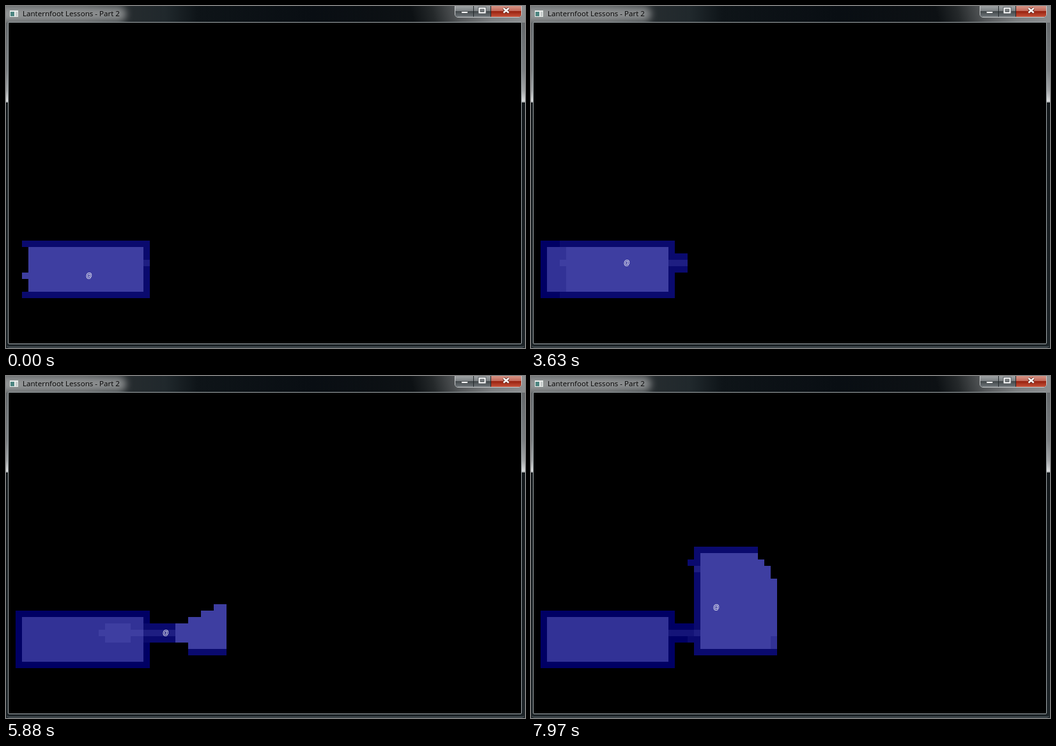
An HTML page with a canvas that plays this animation: 812 px wide and 535 px high, repeating every 8 s.

```html
<!DOCTYPE html>
<html lang="en">
<head>
<meta charset="utf-8">
<title>Lanternfoot Lessons - Part 2</title>
<style>
  html, body { margin: 0; width: 100%; height: 100%; overflow: hidden; background: #0b0f12; }
  .window { position: absolute; left: 0; top: 0; width: 812px; height: 535px; overflow: hidden;
    background: linear-gradient(#0d1215, #0d1215 150px, #12171a 151px, #1d2428); }
  .window * { position: absolute; box-sizing: border-box; }
  .glass { left: 0; top: 0; width: 812px; height: 26px; background:
    linear-gradient(75deg, transparent 78%, #24282a 82%, #56595b 87%, #7d8082 93%, #8c8f91),
    linear-gradient(90deg, #5c6062, #4a4e50 120px, #262c2f 190px, #20282c 250px, #0e1418 300px, #090e13 480px, #0d1114 640px); }
  .glow { left: -14px; top: 1px; width: 202px; height: 23px; border-radius: 11px;
    background: #a2a4a5; opacity: .78; filter: blur(6px); }
  .side { top: 26px; width: 4px; height: 125px;
    background: linear-gradient(#63676a, #7b7f82 60%, #a2a5a7 85%, #d9dbdc 98%, #8a8d8f); }
  .title { left: 26px; top: 3px; font: 11.6px/17px "Open Sans", "Noto Sans", sans-serif; color: #000; white-space: pre; }
  .icon { left: 5px; top: 6px; width: 15px; height: 12px; background: #e9eceb; border: 1px solid #8b9290; }
  .icon i { left: 1px; top: 2px; width: 6px; height: 7px; background: #4c8580; }
  .icon b { left: 9px; top: 2px; width: 3px; height: 7px; background: #c5cbca; }
  .frame { left: 3px; top: 25px; width: 804px; height: 504px; border: 1px solid #a3abae; border-radius: 2px; background: #000; }
  .edge { left: 0; top: -4px; width: 812px; height: 538px; border: 1px solid #59636a; border-top: 0;
    border-color: transparent transparent #667077; border-radius: 0 0 5px 5px; }
  .buttons { left: 702px; top: -2px; width: 105px; height: 20px; border: 1px solid #c9cccd; border-radius: 0 0 5px 5px;
    background: #24292c; overflow: hidden; }
  .btn { top: 0; height: 18px; background: linear-gradient(#a3a7a9, #7d8285 48%, #42484b 52%, #70767a); }
  .close { background: linear-gradient(#d89a8c, #c4695a 48%, #98210f 52%, #c5523a); }
  svg, canvas { left: 0; top: 0; }
</style>
</head>
<body>
<div class="window">
  <div class="glass"></div>
  <div class="glow"></div>
  <div class="side" style="left:0"></div>
  <div class="side" style="left:807px;width:5px"></div>
  <div class="edge"></div>
  <div class="frame"></div>
  <div class="icon"><i></i><b></b></div>
  <div class="title">Lanternfoot Lessons - Part 2</div>
  <div class="buttons">
    <div class="btn" style="left:0;width:28px"></div>
    <div class="btn" style="left:29px;width:26px"></div>
    <div class="btn close" style="left:56px;width:47px"></div>
  </div>
  <svg width="812" height="26" fill="none" stroke="#fff">
    <rect x="712.5" y="8.5" width="10" height="3" fill="#fff" stroke="#53595c"/>
    <rect x="740.5" y="3.5" width="9" height="7" stroke="#53595c" stroke-width="4"/>
    <rect x="740.5" y="3.5" width="9" height="7" stroke-width="2"/>
    <path d="M778.5 3.5l8 7m0-7l-8 7" stroke="#5f2a22" stroke-width="4.4"/>
    <path d="M778.5 3.5l8 7m0-7l-8 7" stroke-width="2.6"/>
  </svg>
  <canvas id="map" width="812" height="535"></canvas>
</div>
<script>
const LOOP = 8000, CELL = 10, LEFT = 5, TOP = 27, COLS = 80, ROWS = 50, RADIUS = 10;
const WALL = 0, TUNNEL = 1, GROUND = 2;
const DARK = ['rgb(0,0,100)', 'rgb(20,20,120)', 'rgb(50,50,150)'];
const LIT = ['rgb(10,10,110)', 'rgb(30,30,130)', 'rgb(62,62,161)'];

// Dungeon
const map = new Uint8Array(COLS * ROWS);
const at = (x, y) => x + y * COLS;
function carve(x0, y0, x1, y1, kind) {
  for (let y = y0; y <= y1; y++)
    for (let x = x0; x <= x1; x++) map[at(x, y)] = kind;
}
carve(2, 35, 20, 41, GROUND);
carve(26, 25, 44, 39, GROUND);
carve(21, 37, 25, 37, TUNNEL);
carve(22, 27, 25, 27, TUNNEL);
carve(35, 22, 35, 24, TUNNEL);

// Field of view: Bresenham rays to the edge of a box, then walls beside lit floor
function castRay(vis, px, py, tx, ty) {
  const sx = Math.sign(tx - px), sy = Math.sign(ty - py);
  const ax = Math.abs(tx - px), ay = Math.abs(ty - py);
  let x = px, y = py, e = Math.max(ax, ay);
  while (x !== tx || y !== ty) {
    if (ax > ay) {
      x += sx;
      e -= 2 * ay;
      if (e < 0) { y += sy; e += 2 * ax; }
    } else {
      y += sy;
      e -= 2 * ax;
      if (e < 0) { x += sx; e += 2 * ay; }
    }
    if ((x - px) ** 2 + (y - py) ** 2 > RADIUS * RADIUS) return;
    vis.add(at(x, y));
    if (map[at(x, y)] === WALL) return;
  }
}

function lightWalls(vis, x0, y0, x1, y1, dx, dy) {
  const light = (x, y) => {
    if (x >= x0 && x <= x1 && y >= y0 && y <= y1 && map[at(x, y)] === WALL) vis.add(at(x, y));
  };
  for (let x = x0; x <= x1; x++)
    for (let y = y0; y <= y1; y++)
      if (vis.has(at(x, y)) && map[at(x, y)] !== WALL) {
        light(x + dx, y);
        light(x, y + dy);
        light(x + dx, y + dy);
      }
}

function look(px, py) {
  const vis = new Set([at(px, py)]);
  const x0 = Math.max(0, px - RADIUS), x1 = px + RADIUS - 1;
  const y0 = Math.max(0, py - RADIUS), y1 = Math.min(ROWS, py + RADIUS) - 1;
  for (let x = x0; x <= x1; x++) { castRay(vis, px, py, x, y0); castRay(vis, px, py, x, y1); }
  for (let y = y0; y <= y1; y++) { castRay(vis, px, py, x0, y); castRay(vis, px, py, x1, y); }
  lightWalls(vis, x0, y0, px, py, -1, -1);
  lightWalls(vis, px, y0, x1, py, 1, -1);
  lightWalls(vis, x0, py, px, y1, -1, 1);
  lightWalls(vis, px, py, x1, y1, 1, 1);
  return vis;
}

// The walk: one key press per time
const KEYS = 'LLLL' + 'RRRRRR' + 'UU' + 'R'.repeat(14) + 'UUUU';
const TIMES = [610, 910, 1150, 1390, 1770, 2000, 2230, 2470, 2780, 3080, 3390, 3630,
  4020, 4220, 4420, 4620, 4820, 5020, 5250, 5420, 5650, 5880, 6110,
  6340, 6640, 6960, 7270, 7500, 7740, 7970];
const MOVE = { L: [-1, 0], R: [1, 0], U: [0, -1] };

const turns = [];
const seen = new Set();
function addTurn(time, x, y) {
  const vis = look(x, y);
  vis.forEach(c => seen.add(c));
  turns.push({ time, x, y, vis, seen: [...seen] });
}
addTurn(0, 12, 39);
TIMES.forEach((time, i) => {
  const last = turns[i], [dx, dy] = MOVE[KEYS[i]];
  addTurn(time, last.x + dx, last.y + dy);
});

const ctx = document.getElementById('map').getContext('2d');
function draw({ x, y, vis, seen }) {
  ctx.clearRect(0, 0, 812, 535);
  for (const c of seen) {
    ctx.fillStyle = (vis.has(c) ? LIT : DARK)[map[c]];
    ctx.fillRect(LEFT + c % COLS * CELL, TOP + Math.floor(c / COLS) * CELL, CELL, CELL);
  }
  ctx.fillStyle = '#fff';
  ctx.font = 'bold 10px "Liberation Sans", Arial, sans-serif';
  ctx.textAlign = 'center';
  ctx.fillText('@', LEFT + x * CELL + 5, TOP + y * CELL + 8);
}

const start = performance.now();
let shown = null;
function tick() {
  const t = (performance.now() - start) % LOOP;
  const turn = turns.findLast(s => s.time <= t) || turns[0];
  if (turn !== shown) draw(shown = turn);
  requestAnimationFrame(tick);
}
tick();
</script>
</body>
</html>
```
